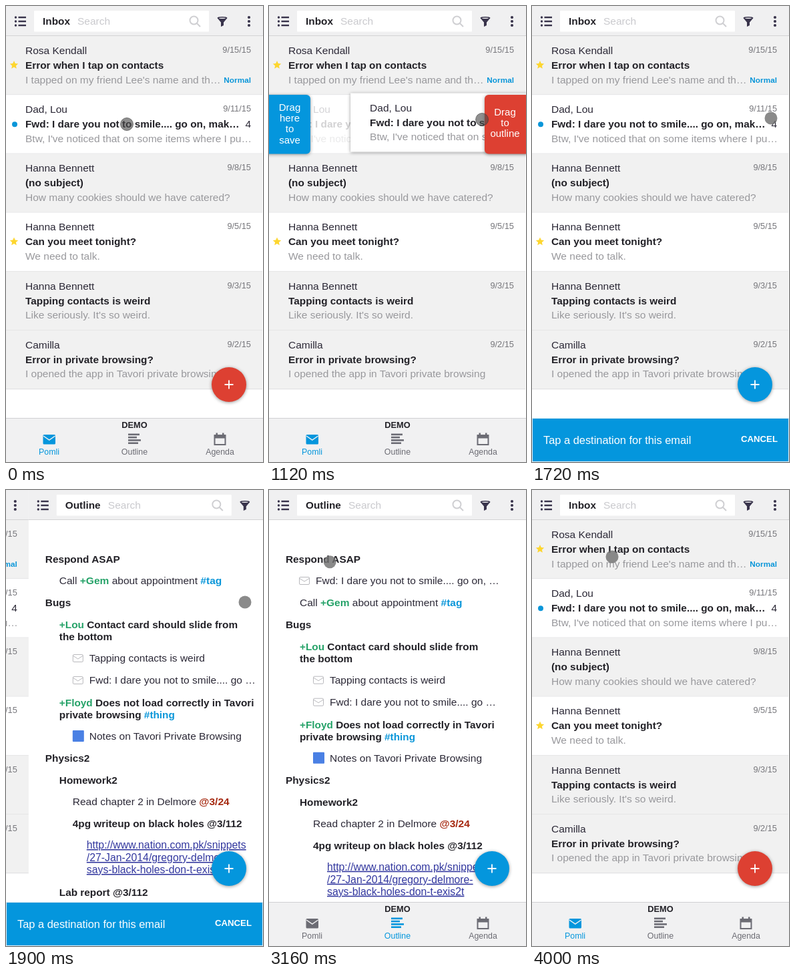
An HTML page that plays this animation: 385x683 px, repeating every 4.02 s.

```html
<!DOCTYPE html>
<html lang="en">
<head>
<meta charset="utf-8">
<title>Drag an email to the outline</title>
<style>
html, body { margin: 0; width: 100%; height: 100%; overflow: hidden; background: #fff; }
svg { display: block; width: 385px; height: 683px; }
text { font: 15.5px "Liberation Sans", Arial, sans-serif; fill: #2b2836; }
.b { font-weight: bold; font-size: 15.35px; fill: #222127; }
.dim { fill: #98989c; }
.hint { fill: #c9c9cd; }
.date { font-size: 12.8px; fill: #77777c; text-anchor: end; }
.tag { font-weight: bold; font-size: 11.8px; fill: #0a96d9; text-anchor: end; }
.green { font-weight: bold; fill: #25a268; }
.blue { font-weight: bold; fill: #0a96d9; }
.red { font-weight: bold; fill: #a5280f; }
.link { font-size: 15.8px; fill: #33389f; text-decoration: underline; }
.tab { font-size: 12.4px; text-anchor: middle; fill: inherit; }
.zone { font-size: 15px; fill: #fff; text-anchor: middle; }
.demo { font-weight: bold; font-size: 12.8px; fill: #222127; text-anchor: middle; }
.prompt { font-size: 16.4px; fill: #fff; }
.cancel { font-weight: bold; font-size: 13.2px; fill: #fff; }
.lift { filter: drop-shadow(0 1px 2.5px rgba(0, 0, 0, .4)); }
</style>
</head>
<body>
<svg id="stage" viewBox="0 0 385 683"></svg>
<script>
const LOOP = 4020, WIDTH = 384, PITCH = 88;
const BLUE = [4, 150, 221], RED = [221, 64, 50], GREY = [108, 108, 116];

const text = (x, y, str, cls = '') => `<text x="${x}" y="${y}" class="${cls}">${str}</text>`;
const rect = (x, y, w, h, fill, more = '') =>
  `<rect x="${x}" y="${y}" width="${w}" height="${h}" fill="${fill}" ${more}/>`;
const circle = (x, y, r, fill) => `<circle cx="${x}" cy="${y}" r="${r}" fill="${fill}"/>`;
const group = (id, body, more = '') => `<g id="${id}" ${more}>${body}</g>`;
const span = (cls, str) => `<tspan class="${cls}">${str}</tspan>`;

function header(title, searchX) {
  const marks = [17, 23, 29].map(y =>
    circle(14.5, y, 1.7, '#38334b') + rect(18.5, y - 1.2, 11.5, 2.4, '#38334b') +
    circle(364, y, 2.1, '#38334b')).join('');
  return rect(0, 0, 385, 44, '#f0f0f1') + rect(0, 44, 385, 1, '#d2d2d4') +
    rect(42, 7, 262, 31.5, '#fff', 'rx="1"') + marks +
    text(55, 28, title, 'b') + text(searchX, 28, 'Search', 'hint') +
    '<g fill="none" stroke="#cfcfd2" stroke-width="2"><circle cx="281.5" cy="21.5" r="6"/><path d="M286 26l5 5"/></g>' +
    '<path d="M316.5 18q0-2 7.5-2t7.5 2l-5.5 6.5v4.5l-4 2v-6.5z" fill="#38334b"/>' +
    '<ellipse cx="324" cy="18.2" rx="5" ry=".8" fill="#f0f0f1"/>';
}

const mails = [
  { from: 'Rosa Kendall', subject: 'Error when I tap on contacts', date: '9/15/15', star: true,
    body: 'I tapped on my friend Lee\'s name and th…', tag: 'Normal' },
  { from: 'Dad, Lou', subject: 'Fwd: I dare you not to smile.... go on, mak…', date: '9/11/15',
    body: 'Btw, I\'ve noticed that on some items where I pu…', count: 4, white: true },
  { from: 'Hanna Bennett', subject: '(no subject)', date: '9/8/15',
    body: 'How many cookies should we have catered?' },
  { from: 'Hanna Bennett', subject: 'Can you meet tonight?', date: '9/5/15', star: true,
    body: 'We need to talk.', white: true },
  { from: 'Hanna Bennett', subject: 'Tapping contacts is weird', date: '9/3/15',
    body: 'Like seriously. It\'s so weird.' },
  { from: 'Camilla', subject: 'Error in private browsing?', date: '9/2/15',
    body: 'I opened the app in Tavori private browsing' }
];

const mailText = (m, y) => text(29, y + 27, m.from) + text(29, y + 49, m.subject, 'b') +
  text(29, y + 70.5, m.body, 'dim') + text(367, y + 25, m.date, 'date') +
  (m.tag ? text(367, y + 70, m.tag, 'tag') : '') + (m.count ? text(358.5, y + 49, m.count) : '');

function star(x, y) {
  const points = Array.from({ length: 10 }, (_, i) => {
    const r = i % 2 ? 3 : 6.5, a = i * Math.PI / 5;
    return [x + r * Math.sin(a), y - r * Math.cos(a)].map(v => v.toFixed(1));
  });
  return `<polygon points="${points.join(' ')}" fill="#fdd62f"/>`;
}

const rows = mails.map((m, i) => {
  const y = 45 + PITCH * i + i * .15;
  return rect(0, y, 385, PITCH, m.white ? '#fff' : '#f1f1f1') + rect(0, y + PITCH - .5, 385, 1, '#dededf') +
    (m.star ? star(12, y + 43.5) : '') +
    (m.count ? group('ghost', mailText(m, y) + circle(13, y + 44, 4, '#0a96d9')) : mailText(m, y));
}).join('');

const envelope = (x, y) => rect(x + .5, y - 10.5, 15, 11, 'none', 'rx="1.5" stroke="#b9b9bd"') +
  `<path d="M${x + 1} ${y - 8.5}l7 4.5l7-4.5" fill="none" stroke="#b9b9bd"/>`;
const mailLink = (x, y, str) => envelope(x, y) + text(x + 25, y, str);
const fwd = 'Fwd: I dare you not to smile.... go ';

const outline = text(25, 109, 'Respond ASAP', 'b') +
  group('added', mailLink(45, 141, fwd + 'on, …')) +
  group('rest',
    text(46, 141, 'Call ' + span('green', '+Gem') + ' about appointment ' + span('blue', '#tag')) +
    text(25, 174, 'Bugs', 'b') +
    text(46, 207, span('green', '+Lou') + ' Contact card should slide from', 'b') +
    text(46, 225, 'the bottom', 'b') +
    mailLink(66, 257, 'Tapping contacts is weird') +
    mailLink(66, 290, fwd + '…') +
    text(46, 324, span('green', '+Floyd') + ' Does not load correctly in Tavori', 'b') +
    text(46, 342, 'private browsing ' + span('blue', '#thing'), 'b') +
    rect(66, 360, 17, 17, '#4a80e4', 'rx="1"') + text(91, 374, 'Notes on Tavori Private Browsing') +
    text(25, 407, 'Physics2', 'b') +
    text(46, 440, 'Homework2', 'b') +
    text(66, 472, 'Read chapter 2 in Delmore ' + span('red', '@3/24')) +
    text(66, 505, '4pg writeup on black holes @3/112', 'b') +
    text(87, 537, 'http://www.nation.com.pk/snippets', 'link') +
    text(87, 556, '/27-Jan-2014/gregory-delmore-', 'link') +
    text(87, 574, 'says-black-holes-don-t-exis2t', 'link') +
    text(46, 608, 'Lab report @3/112', 'b'));

const nav = rect(0, 618, 385, 65, '#f1f1f2') + rect(0, 617, 385, 1, '#d0d0d2') +
  text(192.5, 631.5, 'DEMO', 'demo') +
  group('mailIcon', '<rect x="55.5" y="642" width="18.5" height="14.5" rx="1.5"/>' +
    '<path d="M56 644l8.8 6l8.8-6" fill="none" stroke="#f1f1f2" stroke-width="1.5"/>') +
  group('mailTab', text(64.5, 672, 'Pomli', 'tab')) +
  group('outlineTab', [17, 13, 19, 15].map((w, i) =>
    `<path d="M183 ${640.5 + i * 4.3}h${w}v2.6h-${w}z"/>`).join('') + text(192.5, 672, 'Outline', 'tab')) +
  `<g fill="rgb(${GREY})"><path fill-rule="evenodd" d="M311.5 642h3v-2.5h2.5v2.5h7v-2.5h2.5v2.5h3v16h-18zM313.5 647.5v8.5h14v-8.5z"/>` +
  text(320.5, 672, 'Agenda', 'tab') + '</g>';

const bar = rect(0, 617, 385, 67, '#e4eef3') + rect(1, 618, 383, 64, `rgb(${BLUE})`) +
  text(17, 656, 'Tap a destination for this email', 'prompt') + text(313, 653, 'CANCEL', 'cancel');

const zone = (x, y, words) => words.map((w, i) => text(x, y + i * 16.2, w, 'zone')).join('');

document.getElementById('stage').innerHTML =
  group('mailPage', rect(0, 0, 385, 683, '#fff') + rows + header('Inbox', 107)) +
  group('outlinePage', rect(0, 0, 385, 683, '#fff') + outline + header('Outline', 119)) +
  group('card', rect(0, 133, 385, 88, '#fff') + mailText(mails[1], 133), 'class="lift"') +
  group('leftZone', rect(-8, 133, 70, 88.5, `rgb(${BLUE})`, 'rx="6"') +
    zone(31, 157, ['Drag', 'here', 'to', 'save']), 'class="lift"') +
  group('rightZone', rect(323, 133, 70, 88.5, `rgb(${RED})`, 'rx="6"') +
    zone(353.5, 164, ['Drag', 'to', 'outline']), 'class="lift"') +
  group('fab', '<circle r="26"/><path d="M-6.5 0h13M0-6.5v13" stroke="#fff" stroke-width="1.8"/>', 'class="lift"') +
  group('nav', nav) + group('bar', bar) +
  '<circle id="cursor" r="9.5"/>';

const el = id => document.getElementById(id);
const ramp = (t, a, b) => Math.min(1, Math.max(0, (t - a) / (b - a)));
const smooth = u => u * u * (3 - 2 * u);
const easeOut = u => 1 - (1 - u) ** 3;
const mix = (a, b, k) => `rgb(${a.map((v, i) => Math.round(v + (b[i] - v) * k))})`;
const move = (id, x, y = 0, scale = 1) =>
  el(id).setAttribute('transform', `translate(${x} ${y}) scale(${scale})`);
const show = (id, k) => { el(id).style.opacity = k; };
const paint = (id, color) => { el(id).style.fill = color; };

// time, x, y
const path = [
  [0, 181, 177], [640, 181, 177], [1330, 358, 168], [1990, 358, 168], [2400, 182, 123],
  [2880, 182, 123], [3400, 20, 96], [3480, 20, 96], [3740, 120, 100], [LOOP, 120, 100]
];

function cursorAt(t) {
  const i = path.findIndex(p => p[0] > t), [t0, x0, y0] = path[i - 1], [t1, x1, y1] = path[i];
  const k = smooth(ramp(t, t0, t1));
  return [x0 + (x1 - x0) * k, y0 + (y1 - y0) * k];
}

function draw(t) {
  const [x, y] = cursorAt(t);
  const pressed = t < 1440 || (t > 2480 && t < 2590) || (t > 3430 && t < 3740);

  // Dragging the mail between the two drop zones
  const drag = smooth(ramp(t, 640, 800)) * (1 - smooth(ramp(t, 1440, 1580)));
  const lifted = t > 640 && t < 1500;
  move('card', Math.max(0, x - 197), -2.5 * drag);
  show('card', lifted ? 1 : 0);
  show('ghost', 1 - .8 * drag);
  move('leftZone', -70 * (1 - drag));
  move('rightZone', 70 * (1 - drag));

  // Page position: automatic slide, then a swipe back
  let offset = WIDTH * (1 - easeOut(ramp(t, 1740, 2030)));
  if (t > 3400) offset = x - 20 + (WIDTH - 100) * smooth(ramp(t, 3755, 3970));
  move('mailPage', offset - WIDTH);
  move('outlinePage', offset);

  // The dropped mail joins the outline
  const added = smooth(ramp(t, 2620, 2800));
  move('rest', 0, 32.7 * added);
  show('added', added);

  const back = ramp(t, 3700, 3900), firstHalf = t < 1740;
  const size = t < 1000 ? 1 - smooth(ramp(t, 640, 800)) : smooth(ramp(t, 1460, 1620));
  move('fab', 334, 567, size);
  paint('fab', mix(BLUE, RED, t < 1000 ? 1 : back));

  const onMail = firstHalf || t > 3800;
  paint('mailIcon', mix(GREY, BLUE, firstHalf ? 1 : back));
  paint('mailTab', mix(GREY, BLUE, +onMail));
  paint('outlineTab', mix(BLUE, GREY, +onMail));
  move('bar', 0, 68 * (1 - easeOut(ramp(t, 1480, 1690)) + smooth(ramp(t, 2620, 2820))));

  const dot = el('cursor');
  dot.setAttribute('cx', x);
  dot.setAttribute('cy', y);
  dot.style.fill = pressed ? 'rgba(75,75,75,.62)' : 'rgba(112,112,112,.82)';
  dot.style.stroke = pressed ? 'rgba(60,60,60,.6)' : 'none';
}

function tick() {
  draw(performance.now() % LOOP);
  requestAnimationFrame(tick);
}
tick();
</script>
</body>
</html>
```
